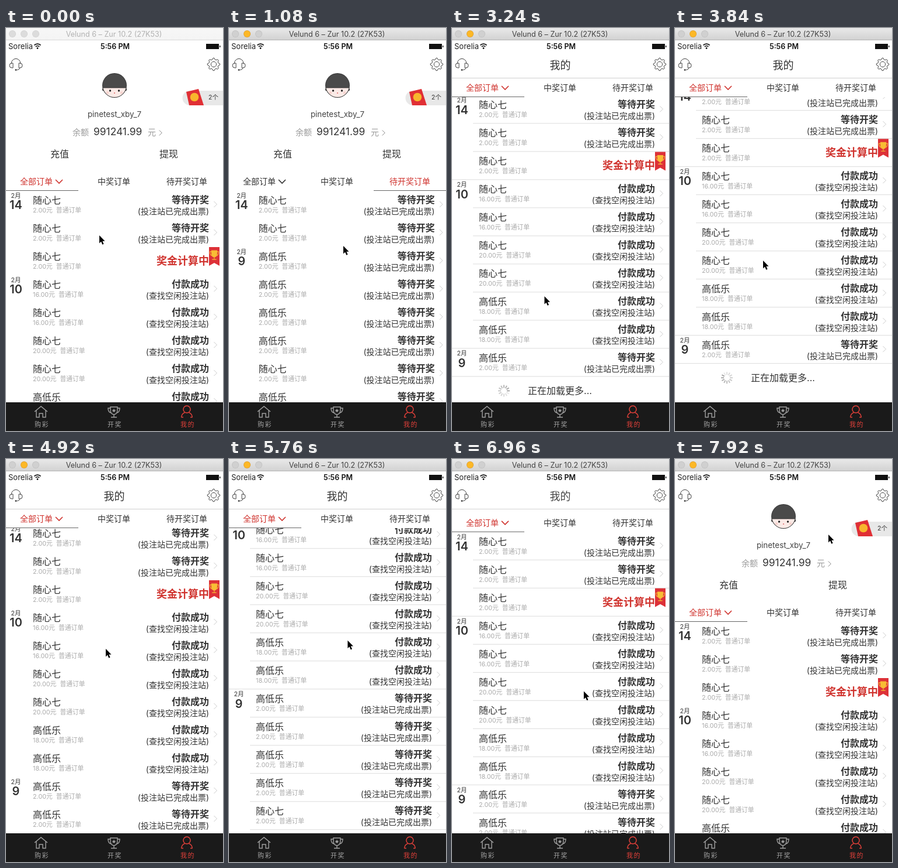
Write an HTML page with a canvas that moves like this. It is 372 px wide and 688 px high and loops after 8000 ms.

```html
<!DOCTYPE html>
<html lang="zh-CN">
<head>
<meta charset="utf-8">
<style>
html, body { margin: 0; width: 100%; height: 100%; overflow: hidden; background: #fff; }
canvas { display: block; width: 372px; height: 688px; }
</style>
</head>
<body>
<canvas id="stage" width="372" height="688"></canvas>
<script>
const ctx = document.getElementById('stage').getContext('2d');
const W = 372, LOOP = 8000, ROW = 48, FOLD = 160, PITCH = 375, TOP = 278, BOTTOM = 639;
const RED = '#d0342f', INK = '#333', SOFT = '#aaa';
const FONT = 'Inter, "Noto Sans CJK SC", "Noto Sans CJK", sans-serif';

// Motion: [time, value, ease into this key]
const IN = 1, OUT = 2;
const pageKeys = [[120, 0], [340, .5, IN], [570, 1, OUT], [640, 1], [840, 1.5, IN], [1126, 2, OUT],
  [1240, 2], [1470, 1.5, IN], [1720, 1, OUT], [1880, 1], [2150, .5, IN], [2540, 0, OUT]];
const barKeys = [[340, 0], [580, 1, OUT], [840, 1], [1080, 2, OUT],
  [1470, 2], [1710, 1, OUT], [2150, 1], [2400, 0, OUT]];
const scrollKeys = [[2660, 0], [3030, 160], [3170, 160], [3600, 196], [3840, 185], [4080, 167, OUT],
  [5280, 167], [5700, 310], [6360, 348, OUT], [6480, 348], [7000, 150], [7160, 146], [7720, 0, OUT]];
const xKeys = [[120, 160], [420, 110], [640, 230], [880, 150], [1080, 196], [1240, 160], [1560, 300],
  [1880, 190], [2100, 392], [2300, 392], [2620, 180], [3030, 160], [3840, 151], [4500, 160], [4920, 171],
  [5240, 190], [6360, 220], [7000, 226], [7800, 215], [7920, 263]];
const yKeys = [[120, 354], [640, 368], [1080, 372], [2100, 390], [2300, 390], [2620, 500], [3030, 340],
  [3170, 460], [3840, 397], [4920, 324], [5240, 460], [5700, 310], [6360, 302], [6500, 200], [7000, 400],
  [7250, 300], [7800, 138], [7920, 129]];

function track(keys, t) {
  if (t <= keys[0][0]) return keys[0][1];
  for (let i = 1; i < keys.length; i++) {
    const [t0, v0] = keys[i - 1], [t1, v1, ease] = keys[i];
    if (t < t1) {
      const u = (t - t0) / (t1 - t0);
      const k = ease === IN ? u * u : ease === OUT ? 1 - (1 - u) ** 2 : u * u * (3 - 2 * u);
      return v0 + (v1 - v0) * k;
    }
  }
  return keys[keys.length - 1][1];
}

// Rows: name, amount, state (w waiting, p paid, c counting, n none), day
const NAMES = { A: '随心七', B: '高低乐', C: '岚跃5', D: '云杯球赛高中低', E: '四方星' };
const parse = s => s.split(',').map(r => {
  const [name, sum, state, day] = r.split(' ');
  return { name: NAMES[name[0]], sum, state, day, kind: name[1] ? '追号订单' : '普通订单' };
});
const ninth = 'B 2 w 2/9,B 2 w,B 2 w,B 2 w,A 2 w,B 2 w';
const pages = [
  'A 2 w 2/14,A 2 w,A 2 c,A 16 p 2/10,A 16 p,A 20 p,A 20 p,B 18 p,B 18 p,' + ninth,
  'A 2 n 2/14,C+ 32 n 1/20,C+ 4 n,C 6 n,C+ 20 n 1/18,D 2 n 12/29,E+ 4 n,D 2 n 12/27',
  'A 2 w 2/14,A 2 w,' + ninth
].map(parse);

function text(s, x, y, size, color = INK, align = 'left', weight = 400) {
  ctx.font = `${weight} ${size}px ${FONT}`;
  ctx.fillStyle = color;
  ctx.textAlign = align;
  ctx.fillText(s, x, y + size * .365);
  return ctx.measureText(s).width;
}
function rect(x, y, w, h, color) {
  ctx.fillStyle = color;
  ctx.fillRect(x, y, w, h);
}
function disc(x, y, r, color) {
  ctx.fillStyle = color;
  ctx.beginPath();
  ctx.arc(x, y, r, 0, 7);
  ctx.fill();
}
function at(x, y, draw, alpha = 1) {
  ctx.save();
  ctx.translate(x, y);
  ctx.globalAlpha *= alpha;
  draw();
  ctx.restore();
}
function clip(top, bottom) {
  ctx.beginPath();
  ctx.rect(0, top, W, bottom - top);
  ctx.clip();
}
function stroke(d, color, width = 1.2) {
  ctx.strokeStyle = color;
  ctx.lineWidth = width;
  ctx.stroke(new Path2D(d));
}
function fill(d, color) {
  ctx.fillStyle = color;
  ctx.fill(new Path2D(d));
}
const arrow = (x, y, w, color) => at(x, y, () => stroke(`M${-w / 2} ${-w} L${w / 2} 0 L${-w / 2} ${w}`, color, 1));

function titleBar(active) {
  const g = ctx.createLinearGradient(0, 0, 0, 20);
  g.addColorStop(0, active ? '#e9e9e9' : '#f7f7f7');
  g.addColorStop(1, active ? '#d2d2d2' : '#f4f4f4');
  rect(0, 0, W, 20, g);
  rect(0, 20, W, 1, active ? '#b4b4b4' : '#d8d8d8');
  [11, 31, 51].forEach((x, i) => {
    const lit = active && i === 1;
    disc(x, 10, 6, lit ? '#dd9c2c' : active ? '#bfbfbf' : '#d0d0d0');
    disc(x, 10, 5.3, lit ? '#fcb827' : active ? '#d0d0d0' : '#dcdcdc');
  });
  text('Velund 6 – Zur 10.2 (27K53)', 185, 10, 12.6, active ? '#444' : '#b2b2b2', 'center');
}

function statusBar() {
  text('Sorelia', 4, 31, 13, '#222');
  at(54, 35, () => {
    disc(0, -.5, 1.4, '#111');
    stroke('M-3.2 -3.2 A4.6 4.6 0 0 1 3.2 -3.2 M-5.6 -5.6 A8 8 0 0 1 5.6 -5.6', '#111', 1.7);
  });
  text('5:56 PM', 187, 31, 12.5, '#111', 'center', 600);
  rect(343, 27, 22, 9, '#111');
  rect(366, 30, 1.5, 3, '#222');
}

function navIcons() {
  at(17, 62, () => {
    stroke('M-8 -1 A8 8.6 0 0 1 8 -1 M-7 -2 h2 v8 h-2 q-4 0 -4 -4 q0 -4 4 -4 M7 -2 h-2 v8 h2 q4 0 4 -4 q0 -4 -4 -4 M7 6 q-1 3.5 -5 3.5', '#444', 1);
    disc(0, 9.5, 1.5, '#444');
  });
  at(356, 62, () => {
    ctx.beginPath();
    for (let i = 0; i < 32; i++) {
      const a = (i - .5) * Math.PI / 16, r = i % 4 < 2 ? 10.7 : 8.3;
      ctx.lineTo(Math.cos(a) * r, Math.sin(a) * r);
    }
    ctx.closePath();
    ctx.strokeStyle = '#444';
    ctx.lineWidth = 1;
    ctx.stroke();
    stroke('M4.6 0 A4.6 4.6 0 1 1 4.6 -.01', '#444', 1);
  });
}

function avatar() {
  at(186, 98, () => {
    disc(-18.5, 7, 2.5, '#3b3b3b');
    disc(18.5, 7, 2.5, '#3b3b3b');
    disc(0, 0, 21, '#3b3b3b');
    disc(0, 0, 20, '#4a4a4a');
    fill('M-19.6 4 H19.6 A20 20 0 0 1 -19.6 4Z', '#fbeae6');
    stroke('M-20.5 4 H20.5', '#333', 1.2);
    disc(-7.5, 9, 1.7, '#222');
    disc(7.5, 9, 1.7, '#222');
    disc(-12, 12.5, 2.2, '#f8d2ce');
    disc(12, 12.5, 2.2, '#f8d2ce');
    disc(0, 13, 1, '#d66');
  });
}

function profile() {
  avatar();
  fill('M315 107 H372 V132 H315 A12.5 12.5 0 0 1 315 107Z', '#e8e8e8');
  fill('M309 109 L330 104 L339 132 H314Z', '#e02f35');
  disc(323, 118, 7.3, '#f8b52d');
  text('2个', 347, 118, 10.5);
  text('pinetest_xby_7', 186, 147, 13.4, '#444', 'center');
  text('余额', 114, 178, 14, '#999');
  text('991241.99', 150, 177, 17.4);
  text('元', 243, 178, 14, '#999');
  arrow(265, 179, 4.5, '#888');
  text('充值', 92, 215, 16, INK, 'center');
  text('提现', 279, 215, 16, INK, 'center');
}

function tabs(index, bar) {
  rect(0, 246, W, 32, '#fff');
  const tint = i => i === index ? RED : INK;
  text('全部订单', 24, 262, 14, tint(0));
  stroke('M85 259 L91 265 L97 259', tint(0), 1.6);
  text('中奖订单', 185, 262, 14, tint(1), 'center');
  text('待开奖订单', 310, 262, 14, tint(2), 'center');
  rect(bar * 124, 277, 124, 1, '#666');
}

function cup(color, star) {
  stroke('M-6 -8 H6 V-3 Q6 4 0 5 Q-6 4 -6 -3Z M-6 -6 H-10 Q-10 1 -5 2 M6 -6 H10 Q10 1 5 2 M0 5 V9 M-5 9.5 H5', color, 1.4);
  if (star) fill('M0 -5.5 L1 -3 3.5 -3 1.6 -1.3 2.3 1.3 0 -.2 -2.3 1.3 -1.6 -1.3 -3.5 -3 -1 -3Z', color);
}

function badge() {
  fill('M348 0 H366 V32 L357 27 L348 32Z', '#dd3138');
  at(357, 13, () => {
    ctx.scale(.75, .85);
    fill('M-6 -8 H6 V-3 Q6 4 0 5 Q-6 4 -6 -3Z', '#f8bd35');
    cup('#f8bd35');
  });
}

function row(r, i, lines) {
  at(0, i * ROW, () => {
    if (lines && i) rect(r.day ? 0 : 36, -1, r.day ? W : W - 36, 1, '#dcdcdc');
    if (r.day) {
      const [m, d] = r.day.split('/');
      text(m + '月', 17, 8, 10.5, INK, 'center');
      text(d, 17, 24, 20, INK, 'center', 600);
    }
    text(r.name, 46, 16, 16);
    const w = text(r.sum + '.00元', 46, 33, 10.8, SOFT);
    text(r.kind, 46 + w + 6, 33, 10.8, SOFT);
    if (r.state === 'c') {
      text('奖金计算中', 348, 23.5, 18, RED, 'right', 600);
      badge();
      return;
    }
    arrow(359, 23, 5, '#ccc');
    if (r.state === 'n') return;
    const paid = r.state === 'p';
    text(paid ? '付款成功' : '等待开奖', 348, 15, 16, INK, 'right', 600);
    text(paid ? '(查找空闲投注站)' : '(投注站已完成出票)', 348, 35, 14, INK, 'right');
  });
}

function loader(t) {
  rect(0, -1, W, 1, '#dcdcdc');
  text('正在加载更多...', 185, 24, 16, INK, 'center');
  at(89, 24, () => {
    const step = Math.floor(t / 83);
    for (let i = 0; i < 12; i++) {
      const age = (step - i + 12) % 12;
      ctx.save();
      ctx.rotate(i * Math.PI / 6);
      ctx.globalAlpha = .75 - age * .05;
      rect(-1, -10, 2, 5, '#888');
      ctx.restore();
    }
  });
}

function lists(t, page, scroll, fold) {
  const loaded = t > 4880, loading = t > 2600 && !loaded;
  const lines = (t > 2700 && t < 4500) || (t > 5360 && t < 7400);
  ctx.save();
  clip(TOP - fold, BOTTOM);
  pages.forEach((rows, n) => {
    const x = (n - page) * PITCH;
    if (Math.abs(x) >= W) return;
    at(x, TOP - scroll, () => {
      const shown = n === 0 && !loaded ? rows.slice(0, 10) : rows;
      shown.forEach((r, i) => row(r, i, lines));
      if (n === 0 && loading) at(0, 10 * ROW, () => loader(t));
    });
  });
  ctx.restore();
}

function bottomBar() {
  rect(0, BOTTOM, W, 49, '#1a1a1a');
  const grey = '#a0a0a0', red = '#e0403a';
  at(60, 655, () => stroke('M-11 0 L0 -9 L11 0 M-8 -2 V9.5 H-3 V3 H3 V9.5 H8 V-2', grey, 1.4));
  at(185, 655, () => cup(grey, true));
  at(310, 655, () => stroke('M0 -10 A6 6 0 1 1 -.01 -10 M-9.5 9.5 Q-8.5 3 -3.5 1.5 M3.5 1.5 Q8.5 3 9.5 9.5 M-9.5 9.5 H-6 M6 9.5 H9.5', red, 1.4));
  ctx.letterSpacing = '1.5px';
  ['购彩', '开奖', '我的'].forEach((s, i) => text(s, 61.5 + i * 125, 677, 11, i === 2 ? red : grey, 'center'));
  ctx.letterSpacing = '0px';
}

function cursor(x, y) {
  at(x, y, () => {
    ctx.scale(.9, .9);
    const d = 'M0 0 V15 L3.4 11.8 L5.8 17.4 L8.4 16.3 L6 10.8 H10.6Z';
    stroke(d, '#fff', 2);
    fill(d, '#000');
  });
}

function draw(t) {
  const page = track(pageKeys, t), scroll = track(scrollKeys, t);
  const fold = Math.min(scroll, FOLD);
  rect(0, 0, W, 688, '#fff');
  lists(t, page, scroll, fold);
  ctx.save();
  clip(41, BOTTOM);
  if (fold < FOLD) at(0, -fold, profile, Math.max(0, 1 - fold / 130));
  at(0, -fold, () => tabs(Math.ceil(page - .5), track(barKeys, t)));
  ctx.restore();
  at(0, 0, () => {
    text('我的', 185.5, 63, 18, INK, 'center', 500);
    rect(0, 85, W, 1, '#d0d0d0');
  }, Math.max(0, (fold - 80) / 80));
  navIcons();
  statusBar();
  titleBar(t >= 120);
  bottomBar();
  cursor(track(xKeys, t), track(yKeys, t));
}

const start = performance.now();
function tick() {
  draw((performance.now() - start) % LOOP);
  requestAnimationFrame(tick);
}
tick();
</script>
</body>
</html>
```
